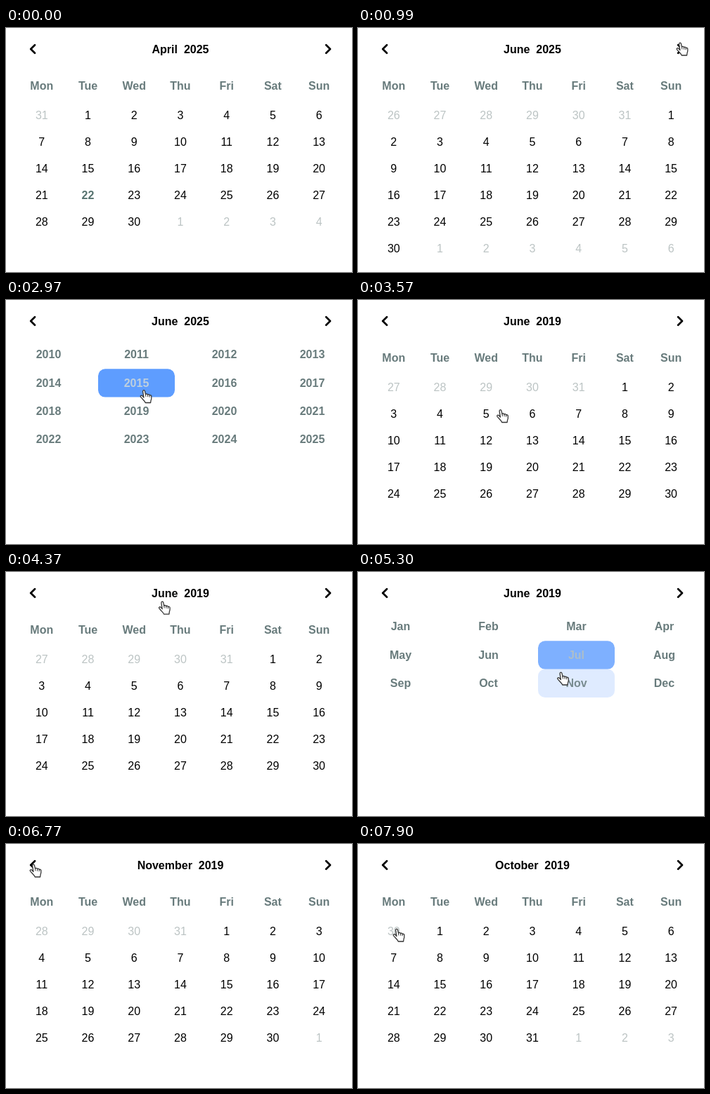
These frames come from a looping animation (492x348 px, 8 s). An HTML page:

```html
<!DOCTYPE html>
<html lang="en">
<head>
<meta charset="utf-8">
<title>Date picker</title>
<style>
  html, body { margin: 0; width: 100%; height: 100%; overflow: hidden; background: #fff; }
  svg { display: block; width: 492px; height: 348px; }
  text { font: 16px "Liberation Sans", Arial, sans-serif; text-anchor: middle; }
  .bold { font-weight: 700; }
  .muted { fill: #bcc4c4; }
  .label { fill: #687b7c; }
  .today { fill: #577370; }
  .arrow { fill: none; stroke: #000; stroke-width: 2.7; stroke-linecap: round; stroke-linejoin: round; }
  .hand { stroke: #333; stroke-width: 1.3; stroke-linejoin: round; stroke-linecap: round; }
</style>
</head>
<body>
<svg viewBox="0 0 492 348">
  <path class="arrow" d="M41 24.3L35.2 30L41 35.7M455.2 24.3L461 30L455.2 35.7"/>
  <g id="stage"></g>
  <g id="cursor" class="hand">
    <path fill="#fff" d="M5.9 11.6L4.6 3.2C4.3 .7 7 .3 7.5 2.6L8.5 7.2C9 6 11.2 6.2 11.5 7.7C12.2 6.7 14 7.1 14.2 8.5C15.1 7.8 16.7 8.4 16.8 9.9C17.1 12.4 16.9 13.9 16 16L15.6 19H8.2C7.6 16.9 5 14.9 3.2 12.7L1.4 10.6C.6 9 2.6 8 3.9 9.3Z"/>
    <path fill="none" d="M8.5 7.2L8.9 10M11.5 7.7L11.7 10.3M14.2 8.5V10.8" stroke-width="1"/>
  </g>
</svg>
<script>
const LOOP = 8000;
const MONTHS = ["January", "February", "March", "April", "May", "June", "July",
  "August", "September", "October", "November", "December"];
const WEEKDAYS = ["Mon", "Tue", "Wed", "Thu", "Fri", "Sat", "Sun"];
const BLACK = [0, 0, 0], LABEL = [104, 123, 124], PALE = [182, 197, 196];

// start time, view, year, month
const VIEWS = [
  [0, "days", 2025, 3], [700, "days", 2025, 4], [990, "days", 2025, 5],
  [2070, "years", 2025, 5], [3300, "days", 2019, 5], [4860, "months", 2019, 5],
  [5820, "days", 2019, 10], [7030, "days", 2019, 9]
];

// time, left, top of the pointer
const PATH = [
  [140, 300, 150], [600, 452, 20], [1120, 452, 20], [1470, 298, 24], [1610, 285, 25],
  [1890, 272.5, 26], [2250, 272.5, 26], [2970, 190, 127.5], [3240, 193, 150],
  [3570, 196.5, 155.5], [3870, 196.5, 155.5], [4540, 220, 19.5], [4900, 220, 19.5],
  [5250, 281, 136.5], [5300, 282.5, 142], [5620, 288, 161], [6020, 288, 161],
  [6770, 33, 28], [7530, 33, 28], [7900, 49, 120], [LOOP, 49, 120]
];

const stage = document.getElementById("stage");
const cursor = document.getElementById("cursor");

const viewAt = t => VIEWS.findLast(v => v[0] <= t);

function pointerAt(t) {
  const i = PATH.findIndex(p => p[0] > t);
  if (i < 1) return null;
  const [t0, x0, y0] = PATH[i - 1], [t1, x1, y1] = PATH[i];
  const k = (t - t0) / (t1 - t0), e = k * k * (3 - 2 * k);
  return [x0 + (x1 - x0) * e, y0 + (y1 - y0) * e];
}

const cellBox = i => [6 + 125 * (i % 4), 58 + 40.3 * Math.floor(i / 4), 109, 40.3];

function hoverAt(t) {
  const p = pointerAt(t);
  if (!p) return null;
  const x = p[0] + 6, y = p[1];
  if (y > 17 && y < 42) {
    if (x >= 253 && x <= 289) return "year";
    if (x >= 207 && x <= 244) return "month";
  }
  const [, kind] = viewAt(t);
  const count = { years: 16, months: 12, days: 0 }[kind];
  for (let i = 0; i < count; i++) {
    const [left, top, w, h] = cellBox(i);
    if (x >= left && x < left + w && y >= top && y < top + h) return kind + i;
  }
  return null;
}

// Hover fades over 150 ms: the share of recent time spent on each item
function hoverShares(t) {
  const shares = {};
  for (let k = 0; k < 30; k++) {
    const item = hoverAt(t - k * 5);
    if (item) shares[item] = (shares[item] || 0) + 1 / 30;
  }
  return key => shares[key] || 0;
}

const mix = (a, b, k) => `rgb(${a.map((v, i) => Math.round(v + (b[i] - v) * k))})`;
const text = (x, y, s, cls, fill) =>
  `<text x="${x}" y="${y}" class="${cls}"${fill ? ` style="fill:${fill}"` : ""}>${s}</text>`;

function title(year, month, share) {
  const span = (s, key) => `<tspan fill="${mix(BLACK, PALE, share(key))}">${s}</tspan>`;
  return text(248, 36, span(MONTHS[month], "month") + "\u00a0\u00a0" + span(year, "year"), "bold");
}

function days(year, month) {
  const column = i => 50.8 + 65.72 * i;
  const offset = (new Date(year, month, 1).getDay() + 6) % 7;
  const length = new Date(year, month + 1, 0).getDate();
  const cells = Math.ceil((offset + length) / 7) * 7;
  let out = WEEKDAYS.map((d, i) => text(column(i), 88, d, "bold label")).join("");
  for (let i = 0; i < cells; i++) {
    const date = new Date(year, month, 1 - offset + i);
    const isToday = year === 2025 && month === 3 && i - offset === 21;
    const cls = date.getMonth() !== month ? "muted" : isToday ? "bold today" : "";
    out += text(column(i % 7), 130 + 38 * Math.floor(i / 7), date.getDate(), cls);
  }
  return out;
}

function picker(kind, share) {
  const labels = kind === "years"
    ? Array.from({ length: 16 }, (_, i) => 2010 + i)
    : MONTHS.map(m => m.slice(0, 3));
  return labels.map((label, i) => {
    const [x, y, w, h] = cellBox(i), k = share(kind + i);
    const back = k ? `<rect x="${x}" y="${y}" width="${w}" height="${h}" rx="10" fill="#5e9dff" fill-opacity="${k}"/>` : "";
    return back + text(x + w / 2, Math.round(y + 25.4), label, "bold", mix(LABEL, [190, 207, 222], k));
  }).join("");
}

function draw(t) {
  const [, kind, year, month] = viewAt(t);
  const share = hoverShares(t);
  stage.innerHTML = title(year, month, share) +
    (kind === "days" ? days(year, month) : picker(kind, share));
  const p = pointerAt(t);
  cursor.style.display = p ? "" : "none";
  if (p) cursor.setAttribute("transform", `translate(${p})`);
}

const start = performance.now();
function tick() {
  draw((performance.now() - start) % LOOP);
  requestAnimationFrame(tick);
}
tick();
</script>
</body>
</html>
```
